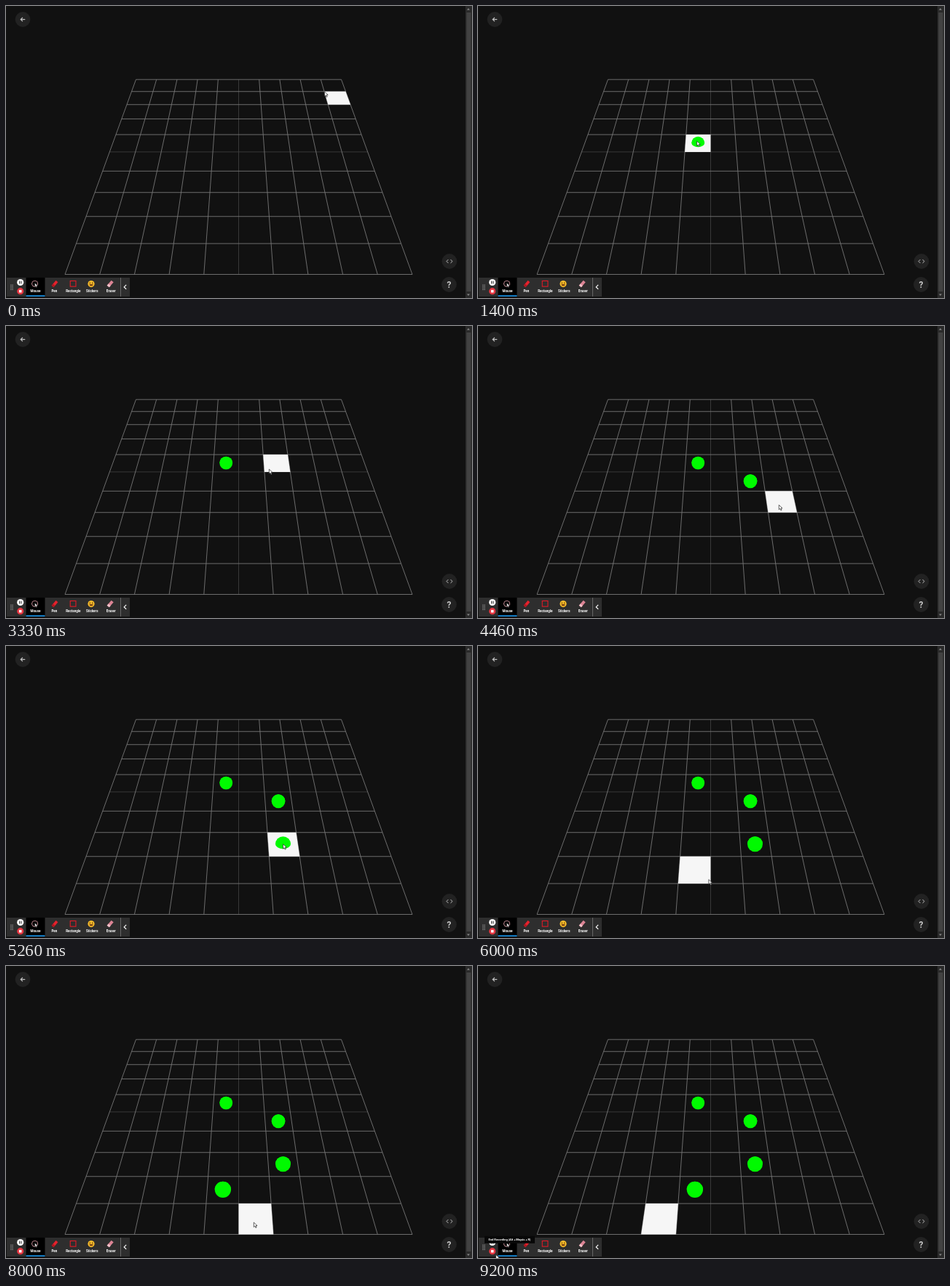
Write an HTML page with a canvas that moves like this. It is 640x402 px and loops after 9.26 s.

```html
<!DOCTYPE html>
<html lang="en">
<head>
<meta charset="utf-8">
<title>Grid placement</title>
<style>
  html, body { margin: 0; width: 100%; height: 100%; overflow: hidden; background: #111; }
  canvas { display: block; }
</style>
</head>
<body>
<canvas id="stage" width="640" height="402"></canvas>
<script>
const ctx = document.getElementById('stage').getContext('2d');
const LOOP = 9260, SIZE = 10;
const CENTER = 319.5, TOP = 101.2, BOTTOM = 369.5, FAR = 141, NEAR = 238.5;
const GREEN = '#00fa00';

// Pointer stops in grid units; a click leaves a ball in the tile.
const stops = [
  { at: 0, col: 9.01, row: 1.01, rest: 60 },
  { at: 220, col: 8.5, row: 0.7 },
  { at: 850, col: 4.6, row: 4.2, rest: 210 },
  { at: 1200, col: 4.45, row: 4.39, rest: 200, click: true },
  { at: 1800, col: 5.3, row: 5.1 },
  { at: 2260, col: 4.3, row: 5.3, rest: 70 },
  { at: 2900, col: 4.8, row: 4.5 },
  { at: 3330, col: 6.19, row: 4.85 },
  { at: 3700, col: 6.5, row: 5.5, rest: 100, click: true },
  { at: 4130, col: 7.35, row: 5.8, rest: 70 },
  { at: 4460, col: 7.42, row: 6.66, rest: 140 },
  { at: 4860, col: 6.5, row: 7.4, rest: 270 },
  { at: 5200, col: 6.5, row: 7.5, rest: 150, click: true },
  { at: 5650, col: 6.3, row: 8.3 },
  { at: 6000, col: 4.94, row: 8.86, rest: 60 },
  { at: 6260, col: 4.5, row: 8.5, rest: 140, click: true },
  { at: 7260, col: 2.96, row: 9.85, rest: 70 },
  { at: 7800, col: 6.3, row: 9.5 },
  { at: 8360, col: 3.4, row: 9.93 },
  { at: 8800, col: -0.93, row: 10.59, rest: LOOP }
];

const mix = (a, b, k) => a + (b - a) * k;
const ease = k => k * k * (3 - 2 * k);

// Half the grid's width on screen: its inverse falls evenly with depth.
const halfWidth = row => 1 / mix(1 / FAR, 1 / NEAR, row / SIZE);

function project(col, row) {
  const half = halfWidth(row);
  return [CENTER + (col / SIZE * 2 - 1) * half, mix(TOP, BOTTOM, (half - FAR) / (NEAR - FAR))];
}

function pointerAt(t) {
  const i = stops.findLastIndex(s => s.at <= t);
  const from = stops[i], to = stops[i + 1] || from;
  const leave = from.at + (from.rest || 0);
  const k = t < leave ? 0 : ease((t - leave) / (to.at - leave));
  return [mix(from.col, to.col, k), mix(from.row, to.row, k)];
}

const tileAt = (col, row) => row < SIZE ? [Math.floor(col), Math.floor(row)] : [3, 9];

function trace(points, close) {
  ctx.beginPath();
  points.forEach(p => ctx.lineTo(...p));
  if (close) ctx.closePath();
}

function line(points, color, width = 1) {
  trace(points);
  ctx.strokeStyle = color;
  ctx.lineWidth = width;
  ctx.stroke();
}

function shape(points, color) {
  trace(points, true);
  ctx.fillStyle = color;
  ctx.fill();
}

function rect(x, y, w, h, color) {
  ctx.fillStyle = color;
  ctx.fillRect(x, y, w, h);
}

function disc(x, y, r, color, from = 0, to = 7) {
  ctx.beginPath();
  ctx.arc(x, y, r, from, to);
  ctx.fillStyle = color;
  ctx.fill();
}

// V-shaped mark with its tip at x, y, opening to the right for size > 0
function chevron(x, y, size, color, width) {
  const h = Math.abs(size);
  line([[x + size, y - h], [x, y], [x + size, y + h]], color, width);
}

// Slanted stick with a tip in a second colour
function stick(x, y, w, color, tipColor) {
  ctx.save();
  ctx.translate(x, y);
  ctx.rotate(Math.PI / 4.5);
  rect(-w / 2, -4.6, w, 9.2, color);
  rect(-w / 2, 1.6, w, 3, tipColor);
  ctx.restore();
}

function text(str, x, y, size, color = '#fff') {
  ctx.font = `bold ${size}px Roboto, sans-serif`;
  ctx.textAlign = 'center';
  ctx.fillStyle = color;
  ctx.fillText(str, x, y);
}

function arrow(x, y, scale = 1) {
  ctx.save();
  ctx.translate(x, y);
  ctx.scale(scale, scale);
  shape([[0, 0], [0, 6.4], [1.5, 5], [2.6, 7.4], [3.8, 6.9], [2.7, 4.6], [4.8, 4.5]], '#fff');
  ctx.strokeStyle = '#222';
  ctx.lineWidth = 0.7;
  ctx.stroke();
  ctx.restore();
}

function drawGrid() {
  const pair = (i, color) => {
    line([project(i, 0), project(i, SIZE)], color, 0.9);
    line([project(0, i), project(SIZE, i)], color, 0.9);
  };
  pair(SIZE / 2, '#3e3e3e');
  for (let i = 0; i <= SIZE; i++) if (i !== SIZE / 2) pair(i, '#777');
}

// A lit tile hides the lower half of the ball standing in it.
function drawBall(col, row, lit) {
  const [x, y] = project(col + 0.5, row + 0.5);
  const r = halfWidth(row + 0.5) * 0.0516;
  disc(x, y, r, GREEN, Math.PI, 2 * Math.PI);
  ctx.beginPath();
  ctx.ellipse(x, y, r, lit ? r * 0.62 : r, 0, 0, 7);
  ctx.fill();
}

function drawButtons() {
  const ink = '#c4c4c4';
  for (const [x, y] of [[23, 18.5], [609, 351.5], [608.5, 383.5]]) disc(x, y, 10.4, '#222');
  line([[26.3, 18.5], [20.3, 18.5]], ink, 1.2);
  chevron(20.2, 18.5, 2.7, ink, 1.2);
  chevron(605, 351.5, 2.4, ink, 1);
  chevron(613, 351.5, -2.4, ink, 1);
  text('?', 608.5, 387.8, 12, ink);
}

function drawScrollbar() {
  rect(631, 0, 9, 402, '#2a2a2a');
  rect(632.5, 9, 6, 384, '#424242');
  shape([[633, 5.5], [637, 5.5], [635, 3]], '#888');
  shape([[633, 396.5], [637, 396.5], [635, 399]], '#888');
}

function drawToolbar() {
  rect(1, 374, 169, 26, '#2e2e2e');
  rect(27.5, 374, 26, 26, '#000');
  rect(27.5, 398.2, 26, 1.8, '#1689d8');
  rect(157, 374, 1, 26, '#666');
  for (let i = 0; i < 8; i++) rect(6.3 + i % 2 * 2.2, 383.6 + (i >> 1) * 2.1, 1.1, 1.1, '#aaa');

  disc(19.7, 380.5, 4.6, '#fff');
  rect(18, 378.6, 1.1, 3.8, '#333');
  rect(20.3, 378.6, 1.1, 3.8, '#333');
  disc(19.7, 392.7, 4.6, '#e5343f');
  rect(17.9, 390.9, 3.6, 3.6, '#fff');

  disc(39.6, 382.3, 4.4, '#d99aa4');
  disc(39.6, 382.3, 3.5, '#000');
  arrow(39.6, 381.4, 0.8);
  stick(67, 382.5, 3.6, '#e5222c', '#b0161f');
  rect(87.7, 377.9, 8.8, 8.8, '#e01b26');
  rect(88.8, 379, 6.6, 6.6, '#2e2e2e');
  disc(117, 382.6, 4.6, '#f8bd2a');
  for (const side of [-1, 1]) disc(117 + side * 1.7, 381.4, 0.8, '#5a3a10');
  disc(117, 383, 2.5, '#7c4312', 0, Math.PI);
  stick(143.2, 382.5, 4, '#dd8495', '#f3c3cb');

  ['Mouse', 'Pen', 'Rectangle', 'Stickers', 'Eraser']
    .forEach((label, i) => text(label, 40.5 + i * 25.9, 394, 4.5));
  chevron(162.2, 386.9, 3, '#fff', 1.2);
}

function drawTooltip() {
  rect(9, 371.8, 69, 10, '#080808');
  text('End Recording (Alt + Mayús + R)', 43.5, 378.2, 4);
}

function draw(now) {
  const t = now % LOOP;
  const pointer = pointerAt(t);
  const [col, row] = tileAt(...pointer);

  rect(0, 0, 640, 402, '#111');
  drawGrid();
  shape([project(col, row), project(col + 1, row), project(col + 1, row + 1), project(col, row + 1)], '#f6f6f6');
  for (const stop of stops) {
    if (!stop.click || t < stop.at) continue;
    const [c, r] = tileAt(stop.col, stop.row);
    drawBall(c, r, c === col && r === row);
  }

  drawButtons();
  drawScrollbar();
  drawToolbar();
  if (t >= 8860) drawTooltip();
  arrow(...project(...pointer));
  requestAnimationFrame(draw);
}
requestAnimationFrame(draw);
</script>
</body>
</html>
```
